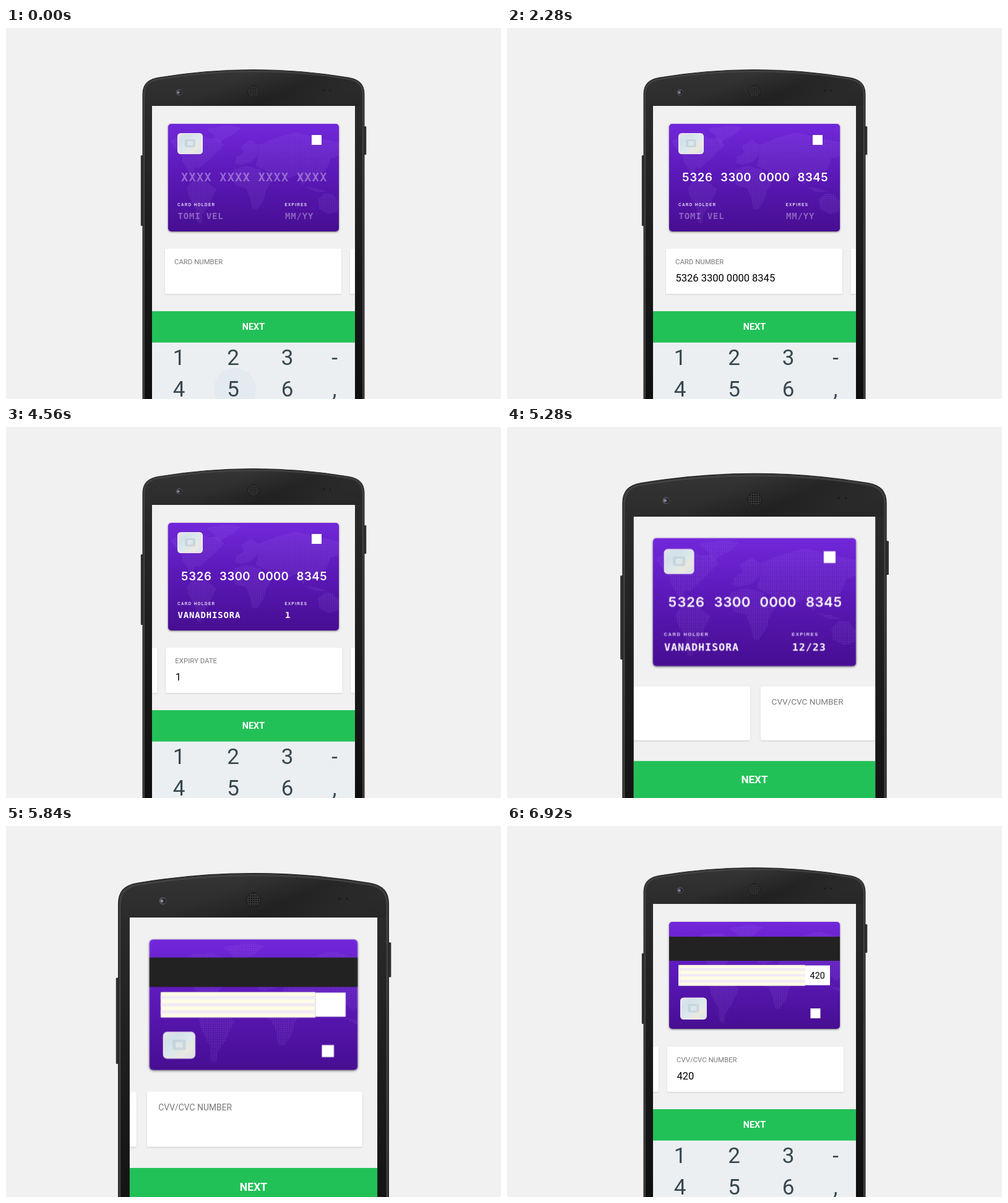
Recreate the animation shown at these times as an HTML page. Size 800 by 600 pixels, loop 6960 ms.

```html
<!DOCTYPE html>
<html lang="en">
<head>
<meta charset="utf-8">
<title>Card checkout</title>
<style>
  html, body { margin: 0; width: 100%; height: 100%; overflow: hidden; background: #f1f1f1; }
  #stage { position: absolute; left: 0; top: 0; width: 800px; height: 600px; overflow: hidden; background: #f1f1f1; }
  #phone { position: absolute; width: 800px; height: 600px; transform-origin: 400px 26px; }
  svg { position: absolute; left: 0; top: 0; display: block; }
  #screen { position: absolute; left: 236px; top: 126px; width: 328px; height: 474px; overflow: hidden; background: #f1f1f1; }
  #space { position: absolute; left: 0; top: 0; width: 328px; height: 474px; perspective: 480px; perspective-origin: 164px 295px; }
  #card { position: absolute; left: 26px; top: 29px; width: 276px; height: 174px; transform-style: preserve-3d; }
  .face { position: absolute; width: 276px; height: 174px; border-radius: 5px; overflow: hidden;
    backface-visibility: hidden; box-shadow: 0 1px 3px rgba(0, 0, 0, .55); }
  #back { transform: rotateY(180deg); height: 173px; }
  text { font-family: Roboto, sans-serif; }
  .field rect { fill: #fff; filter: drop-shadow(0 1px 1px rgba(0, 0, 0, .14)); }
  .label { font-size: 11.4px; fill: #7a7a7a; }
  .value { font-size: 16.5px; fill: #000; }
  .key { font-size: 35px; fill: #37474f; text-anchor: middle; }
  .letter { font-size: 21px; fill: #37474f; text-anchor: middle; }
  .hint { font-size: 9px; fill: #546e7a; text-anchor: middle; }
  .next { font-size: 14.4px; font-weight: 700; fill: #fff; text-anchor: middle; }
  .small { font: bold 6.3px "Liberation Sans", sans-serif; letter-spacing: 1.35px; fill: #e9e0f6; }
  .number { font: 600 18.6px Inter, sans-serif; text-anchor: middle; fill: #fff; }
  .print { font: bold 14px "DejaVu Sans Mono", monospace; text-anchor: middle; fill: #fff; }
  .empty { fill-opacity: .35; }
  .number.empty { font: bold 18.6px "DejaVu Sans Mono", monospace; }
</style>
</head>
<body>
<div id="stage">
 <div id="phone">
  <svg width="800" height="600" viewBox="0 0 800 600">
   <defs>
    <linearGradient id="body" x1="0" y1="0" x2="0" y2="1">
     <stop offset="0" stop-color="#343434"/><stop offset=".11" stop-color="#2a2a2a"/>
     <stop offset=".5" stop-color="#1c1c1c"/><stop offset="1" stop-color="#0e0d0d"/>
    </linearGradient>
    <linearGradient id="sheen" x1="0" y1="0" x2="1" y2=".35">
     <stop offset=".45" stop-color="#000" stop-opacity="0"/><stop offset=".75" stop-color="#000" stop-opacity=".26"/>
     <stop offset="1" stop-color="#000" stop-opacity=".1"/>
    </linearGradient>
    <linearGradient id="purple" x1="0" y1="0" x2="0" y2="1">
     <stop offset="0" stop-color="#7228db"/><stop offset=".45" stop-color="#5c19b9"/><stop offset="1" stop-color="#470e92"/>
    </linearGradient>
    <linearGradient id="foil" x1="0" y1="0" x2="1" y2="1">
     <stop offset="0" stop-color="#e9e3ee"/><stop offset=".25" stop-color="#d3e1e8"/><stop offset=".5" stop-color="#dbe9ee"/>
     <stop offset=".75" stop-color="#ece8e0"/><stop offset="1" stop-color="#d3e1ec"/>
    </linearGradient>
    <pattern id="dots" width="2.9" height="2.9" patternUnits="userSpaceOnUse">
     <circle cx="1.45" cy="1.45" r=".95" fill="#b48cf0" fill-opacity=".27"/>
    </pattern>
    <pattern id="holes" width="3" height="3" patternUnits="userSpaceOnUse">
     <circle cx="1.5" cy="1.5" r="1" fill="#070707"/>
    </pattern>
    <g id="map" fill="url(#dots)">
     <path d="M4 28L22 18 48 16 66 24 78 22 90 34 76 48 66 58 50 72 44 70 40 78 50 88 46 90 34 78 24 62 20 46 10 38Z"/>
     <path d="M62 8L96 3 118 6 104 18 92 24 82 32 74 18Z"/>
     <path d="M40 92L60 92 78 106 72 118 66 132 56 146 53 162 46 158 45 138 34 118 30 104Z"/>
     <path d="M106 74L126 68 150 74 158 90 168 92 158 108 154 124 144 138 136 138 132 118 126 104 110 100 102 88Z"/>
     <path d="M108 64L110 54 122 46 118 36 134 26 146 34 144 52 134 62 118 66Z"/>
     <path d="M146 34L176 22 206 14 240 22 276 30 276 52 262 56 256 74 244 82 236 94 226 86 218 100 208 82 196 88 178 80 170 88 158 76 142 68 146 50Z"/>
     <path d="M222 102L240 104 256 110 238 110Z"/>
     <path d="M242 122L254 112 266 114 276 126 274 142 260 146 244 138Z"/>
    </g>
    <g id="chip">
     <rect x=".7" y=".7" width="39.6" height="32.6" rx="4.500" fill="url(#foil)" stroke="#f1eaf0" stroke-width="1.400"/>
     <rect x="12" y="10" width="17" height="13" rx="2" fill="#b6c6d0" fill-opacity=".5"/>
     <rect x="16" y="13" width="9" height="7" rx="1" fill="#e2ebee" fill-opacity=".8"/>
    </g>
   </defs>
   <g fill="#303030">
    <rect x="217.800" y="206" width="6" height="114" rx="1"/>
    <rect x="576.300" y="159" width="6" height="46" rx="1"/>
   </g>
   <path d="M221 620V108C221 92 228 83.500 246 80.300Q400 54.700 554 80.300C572 83.500 579 92 579 108V620Z" fill="#3a3a3a" stroke="#1f1f1f"/>
   <path d="M223.500 620V109C223.500 95 230 86 247 83Q400 58 553 83C570 86 576.500 95 576.500 109V620Z" fill="url(#body)" stroke="#5a5a5a" stroke-width=".6"/>
   <path d="M224 126V109C224 95 230 86 247 83Q400 58 553 83C570 86 576 95 576 109V126Z" fill="url(#sheen)"/>
   <circle cx="279.800" cy="104" r="4.800" fill="#585858"/>
   <circle cx="280.600" cy="104.200" r="3.400" fill="#232336"/>
   <circle cx="278.800" cy="104.200" r="1.900" fill="#8a8a9c"/>
   <circle cx="400" cy="102.500" r="9.300" fill="#3b3b3b" stroke="#111" stroke-width=".8"/>
   <circle cx="400" cy="102.500" r="8.300" fill="url(#holes)"/>
   <g fill="#1b1b1b"><circle cx="514" cy="101" r="1.700"/><circle cx="524" cy="101" r="1.500"/></g>
  </svg>

  <div id="screen">
   <svg width="328" height="474" viewBox="236 126 328 474">
    <g id="track"></g>
    <svg x="236" y="507" width="328" height="93" viewBox="236 507 328 93">
     <rect x="236" y="507" width="328" height="93" fill="#ebeff2"/>
     <circle id="ripple" fill="#b4c8e4"/>
     <g id="digits"></g>
     <g id="letters"></g>
    </svg>
    <rect x="236" y="458" width="328" height="50" fill="#22c157"/>
    <rect id="lip" x="236" y="507" width="328" height="1.700" fill="#22c157"/>
    <text class="next" x="400" y="488.200">NEXT</text>
   </svg>
   <div id="space">
    <div id="card">
     <div class="face">
      <svg width="276" height="174" viewBox="0 0 276 174">
       <rect width="276" height="174" fill="url(#purple)"/>
       <use href="#map"/>
       <use href="#chip" x="15" y="15"/>
       <rect x="232" y="18" width="16" height="16" fill="#fff"/>
       <text class="small" x="15" y="133">CARD HOLDER</text>
       <text class="small" x="188.500" y="133">EXPIRES</text>
       <text id="number" y="93.200"></text>
       <text id="holder" y="153.500"></text>
       <text id="expires" y="153.500"></text>
      </svg>
     </div>
     <div class="face" id="back">
      <svg width="276" height="174" viewBox="0 0 276 174">
       <rect width="276" height="174" fill="url(#purple)"/>
       <use href="#map" x="35" y="2"/>
       <rect y="24" width="276" height="39" fill="#222"/>
       <rect x="15" y="69.700" width="205" height="33.800" rx="1" fill="#fffde6"/>
       <path d="M15 77H220M15 86.500H220M15 96H220" stroke="#f1ebf6" stroke-width="4.200"/>
       <rect x="220" y="70.500" width="40" height="32" fill="#fff"/>
       <text id="code" x="227.600" y="91.800" font-size="14.400"></text>
       <use href="#chip" transform="translate(18 122.500) scale(1.045)"/>
       <rect x="228.500" y="140" width="16" height="16" fill="#fff"/>
      </svg>
     </div>
    </div>
   </div>
  </div>
 </div>
</div>

<script>
const LOOP = 6960, STEP = 40, PITCH = 299, PAGE = 298.33;
const $ = id => document.getElementById(id);

function set(node, attrs) {
  for (const name in attrs) node.setAttribute(name, attrs[name]);
}

function add(parent, tag, attrs, text = '') {
  const node = document.createElementNS('http://www.w3.org/2000/svg', tag);
  set(node, attrs);
  node.textContent = text;
  return parent.appendChild(node);
}

// Typed entries: one time per typed character, spaces come for free.
const entries = [
  { label: 'CARD NUMBER', text: '5326 3300 0000 8345', taps: true,
    times: [400, 560, 680, 800, 920, 1040, 1120, 1240, 1360, 1480, 1600, 1720, 1960, 2000, 2040, 2080] },
  { label: 'CARD HOLDER’S NAME', text: 'Vanadhisora', taps: true,
    times: [2620, 2680, 2880, 3040, 3200, 3360, 3520, 3680, 3840, 4000, 4160] },
  { label: 'EXPIRY DATE', text: '12/23', times: [4560, 4600, 4640, 4680, 4720] },
  { label: 'CVV/CVC NUMBER', text: '420', times: [5920, 6040, 6160] }
];

entries.forEach((entry, i) => {
  const left = 257 + i * PITCH;
  const field = add($('track'), 'g', { class: 'field' });
  add(field, 'rect', { x: left, y: 356.7, width: 285, height: 73.2, rx: 1.5 });
  add(field, 'text', { class: 'label', x: left + 15, y: 381.6 }, entry.label);
  entry.value = add(field, 'text', { class: 'value', x: left + 15.5, y: 410 });
});

// Keyboards; keyAt remembers the centre of every visible key.
const keyAt = {};
['123-', '456,'].forEach((row, j) => [...row].forEach((char, i) => {
  const x = [279.5, 367, 454.5, 531][i], y = 533 + j * 51;
  keyAt[char] = [x, y];
  add($('digits'), 'text', { class: 'key', x, y: y + 12.3 }, char);
}));
['qwertyuiop', 'asdfghjkl'].forEach((row, j) => [...row].forEach((char, i) => {
  const x = 260 + j * 15.3 + i * 31.95, y = j ? 590 : 542;
  keyAt[char] = [x, y];
  add($('letters'), 'text', { class: 'letter', x, y: j ? 596.5 : 550.3 }, char);
  if (!j) add($('letters'), 'text', { class: 'hint', x: x + 9, y: 534 }, (i + 1) % 10);
}));

const taps = entries.filter(e => e.taps).flatMap(e =>
  [...e.text.replace(/ /g, '').toLowerCase()].map((char, i) => ({ char, at: e.times[i] })));

const clamp = v => Math.min(1, Math.max(0, v));
const inOut = (p, n) => p < .5 ? (2 * p) ** n / 2 : 1 - (2 - 2 * p) ** n / 2;
const ramp = (t, from, to, n = 3) => inOut(clamp((t - from) / (to - from)), n);

function typed({ text, times }, t) {
  let left = times.filter(at => at <= t).length, out = '';
  for (const char of text) {
    if (char !== ' ' && left-- <= 0) break;
    out += char;
  }
  return out.trim();
}

// Embossed text: every character sits in a cell of equal pitch.
function emboss(node, kind, text, blank, x, pitch) {
  const shown = text || blank;
  if (node.textContent === shown) return;
  node.textContent = shown;
  set(node, {
    class: text ? kind : kind + ' empty',
    x: [...shown].map((_, i) => x + i * pitch).join(' ')
  });
}

function drawRipple(t) {
  const tap = taps.filter(p => p.at <= t).pop();
  let spot = [370, 584], r = 34, alpha = .15;
  if (tap) {
    const age = t - tap.at;
    spot = keyAt[tap.char];
    r = 36 * Math.min(1, .6 + age / 200);
    alpha = .4 * clamp((200 - age) / 100);
  }
  const [cx, cy] = spot || [0, 0];
  set($('ripple'), { cx, cy, r, 'fill-opacity': spot ? alpha : 0 });
}

function draw(t) {
  const zoom = 1 + .22 * (ramp(t, 4840, 5490) - ramp(t, 6760, 6920, 4));
  $('phone').style.transform = `scale(${zoom})`;

  const page = ramp(t, 2280, 2600) + ramp(t, 4280, 4560) + ramp(t, 5120, 5440);
  $('track').setAttribute('transform', `translate(${-PAGE * page} 0)`);
  $('card').style.transform = `rotateY(${-180 * ramp(t, 5280, 5840)}deg)`;

  const words = entries.map(entry => entry.value.textContent = typed(entry, t));
  emboss($('number'), 'number', words[0], 'XXXX XXXX XXXX XXXX', 26.6, 12.46);
  emboss($('holder'), 'print', words[1].toUpperCase(), 'TOMI VEL', 19.6, 9.25);
  emboss($('expires'), 'print', words[2], 'MM/YY', 193.3, 9.25);
  $('code').textContent = words[3];

  const spelling = t >= 2440 && t < 4420;
  $('letters').style.display = spelling ? '' : 'none';
  $('digits').style.display = spelling ? 'none' : '';
  $('lip').style.display = spelling ? 'none' : '';
  drawRipple(t);
}

// The motion advances at 25 pictures a second; the slack absorbs clock jitter.
const start = performance.now() - 4;
function tick() {
  const t = (performance.now() - start) % LOOP;
  draw(Math.floor(t / STEP) * STEP);
  requestAnimationFrame(tick);
}
draw(0);
requestAnimationFrame(tick);
</script>
</body>
</html>
```
